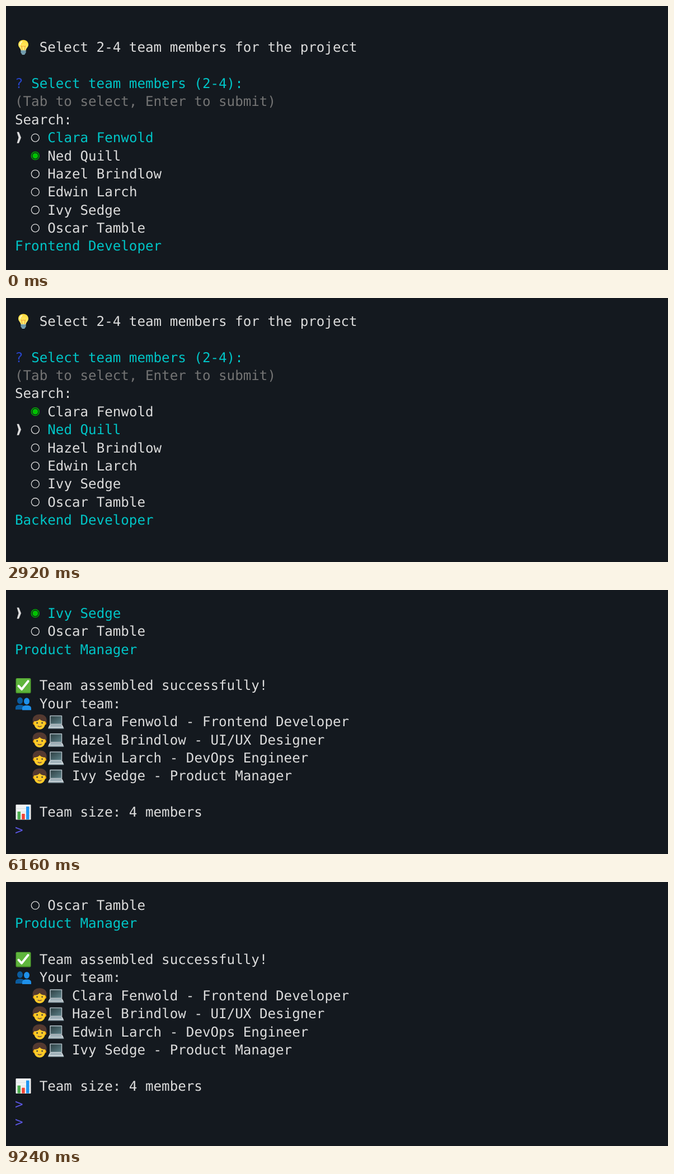
Write an HTML page that moves like this. It is 1183 px wide and 473 px high and loops after 9.28 s.

```html
<!DOCTYPE html>
<html lang="en">
<head>
<meta charset="utf-8">
<title>Team selection prompt</title>
<style>
  html, body { margin: 0; width: 100%; height: 100%; overflow: hidden; background: #14191f; }
  svg { display: block; width: 1183px; height: 473px; }
  text { font: 24.2px "DejaVu Sans Mono", "Noto Sans Mono", monospace; text-rendering: geometricPrecision; }
</style>
</head>
<body>
<svg viewBox="0 0 1183 473">
  <defs>
    <linearGradient id="glass" x2="0" y2="1">
      <stop offset="0" stop-color="#ffd93b"/><stop offset="1" stop-color="#fff176"/>
    </linearGradient>
    <linearGradient id="screen" x2="1" y2="1">
      <stop offset="0" stop-color="#2f4145"/><stop offset="1" stop-color="#5c8087"/>
    </linearGradient>
    <g id="bulb">
      <path d="M14 .5C8.500.5 5 4.400 5 9c0 4.500 4 6 4.600 10.500h8.800C19 15 23 13.500 23 9 23 4.400 19.500.5 14 .5Z" fill="url(#glass)"/>
      <path d="M12 19 10.500 11l2 1.500 1.500-1.500 1.500 1.500 2-1.500L16 19" fill="none" stroke="#f19534"/>
      <path d="M9.500 19h9v4.500l-2.500 3.500h-4l-2.500-3.500Z" fill="#82aec0"/>
      <path d="M9.500 21.500h9M10 24h8" stroke="#557b8a"/>
      <path d="M8 9Q8.500 5 11.500 3.500" fill="none" stroke="#fff9c4" stroke-width="2" stroke-linecap="round"/>
    </g>
    <g id="check">
      <rect x=".5" y=".5" width="27" height="27" rx="2" fill="#4c9a2a"/>
      <rect x="1.500" y="1" width="25" height="24.500" rx="2" fill="#5fb53d"/>
      <path d="M5.500 14.500 11 20.500 22.500 6" fill="none" stroke="#fff" stroke-width="4" stroke-linecap="round" stroke-linejoin="round"/>
    </g>
    <g id="bust">
      <ellipse cx="8" cy="8.500" rx="5" ry="6"/>
      <path d="M0 24.500v-3c0-4 3-5.500 8-5.500s8 1.500 8 5.500v3Z"/>
    </g>
    <g id="people">
      <use href="#bust" fill="#0b5c9e"/>
      <use href="#bust" x="12" y="1" fill="#1e90ea"/>
    </g>
    <g id="person">
      <path d="M14 .5C6 .5 1.500 5 1.500 11c0 3 .5 5 1.500 6.500h22c1-1.500 1.500-3.500 1.500-6.500C26.500 5 22 .5 14 .5Z" fill="#543930"/>
      <rect x="2" y="14" width="24" height="5.500" rx="2.700" fill="#e59600"/>
      <path d="M4 13c5 0 8-1.500 10-4 2 2.500 5 4 10 4v3c0 7-4.500 11.500-10 11.500S4 23 4 16Z" fill="#ffca28"/>
      <circle cx="9.500" cy="16" r="1.400" fill="#404040"/>
      <circle cx="18.500" cy="16" r="1.400" fill="#404040"/>
      <path d="M10.500 21.500Q14 24 17.500 21.500" fill="none" stroke="#795548" stroke-width="1.500"/>
    </g>
    <g id="laptop">
      <rect x="3" y="2.500" width="22" height="16.500" rx="1" fill="#b0bec5"/>
      <rect x="4.500" y="4" width="19" height="13.500" fill="url(#screen)"/>
      <path d="M3 19h22l3 6H0Z" fill="#cfd8dc"/>
      <path d="M4 20.500h20M3.500 22.300h21" stroke="#78909c"/>
      <path d="M0 25h28v1.500H0Z" fill="#90a4ae"/>
    </g>
    <g id="chart">
      <rect x=".5" y=".5" width="27" height="27" rx="1" fill="#f1f3f4"/>
      <path d="M.5 7.500h27M.5 14h27M.5 20.500h27" stroke="#cfd8dc" stroke-width=".7"/>
      <path d="M3.500 13h5.500v14H3.500Z" fill="#4caf50"/>
      <path d="M11.200 17h5.500v10h-5.500Z" fill="#f44336"/>
      <path d="M19 4h5.500v23H19Z" fill="#2196f3"/>
    </g>
  </defs>
  <g id="stage"></g>
</svg>
<script>
const LOOP = 9280, LEFT = 16, TOP = 25, CELL = 14.567, LINE = 32.36;
const WHITE = '#dcdcdc', CYAN = '#00c5c7', GREEN = '#00c200', YELLOW = '#c7c400',
      GRAY = '#747474', BLUE = '#2744c7', PROMPT = '#5a56e0';

// Each member is selected during [on, off).
const MEMBERS = [
  { name: 'Clara Fenwold',  role: 'Frontend Developer', on: 2120 },
  { name: 'Ned Quill',      role: 'Backend Developer',  on: 0, off: 2920 },
  { name: 'Hazel Brindlow', role: 'UI/UX Designer',     on: 3760 },
  { name: 'Edwin Larch',    role: 'DevOps Engineer',    on: 4600 },
  { name: 'Ivy Sedge',      role: 'Product Manager',    on: 5400 },
  { name: 'Oscar Tamble',   role: '',                   on: LOOP }
];
const MOVES = [2880, 3720, 4480, 5320];
const BLINKS = [6200, 6560, 6840, 7160, 7280, 7560, 7760, 8040, 8320, 8560, 8840, 9240];
const ERROR_ON = 720, ERROR_OFF = 2120, SUBMIT = 6160, NEW_PROMPT = 7760;

const x = col => LEFT + col * CELL;
const y = row => TOP + row * LINE;
const passed = (times, t) => times.filter(time => time <= t).length;
const isSelected = (member, t) => t >= member.on && t < (member.off ?? LOOP);

const text = (col, row, string, color = WHITE) =>
  `<text x="${x(col)}" y="${y(row) + 25}" fill="${color}">${string.replace('>', '&gt;')}</text>`;
const icon = (id, col, row) => `<use href="#${id}" x="${x(col) + 1}" y="${y(row) + 3}"/>`;
const ring = (row, r, attributes) =>
  `<circle cx="52.3" cy="${y(row) + 16.9}" r="${r}" ${attributes}/>`;

function option(row, member, selected, active) {
  const color = selected ? GREEN : WHITE;
  return (active ? `<path transform="translate(0 ${y(row)})" fill="${WHITE}"
      d="M19.500 6.500h3.500L27 16.500 23 26.500h-3.500L22.500 16.500Z"/>` : '')
    + ring(row, 7, `fill="none" stroke="${color}" stroke-width="1.300"`)
    + (selected ? ring(row, 5, `fill="${color}"`) : '')
    + text(4, row, member.name, active ? CYAN : WHITE);
}

function selection(t) {
  const top = t < ERROR_ON ? 1 : 0;
  const hasError = t >= ERROR_ON && t < ERROR_OFF;
  const first = top + (hasError ? 6 : 5);
  const active = passed(MOVES, t);
  return icon('bulb', 0, top) + text(3, top, 'Select 2-4 team members for the project')
    + text(0, top + 2, '?', BLUE) + text(2, top + 2, 'Select team members (2-4):', CYAN)
    + text(0, top + 3, '(Tab to select, Enter to submit)', GRAY)
    + text(0, top + 4, 'Search:')
    + (hasError ? text(0, 5, '> Please select at least 2 team members', YELLOW) : '')
    + MEMBERS.map((m, i) => option(first + i, m, isSelected(m, t), i === active)).join('')
    + text(0, first + MEMBERS.length, MEMBERS[active].role, CYAN);
}

function summary(t) {
  const top = t < NEW_PROMPT ? 0 : -1;
  const team = MEMBERS.filter(m => isSelected(m, t));
  const cursorOn = passed(BLINKS, t) % 2;
  return (top ? text(0, 11, '>', PROMPT) : option(0, MEMBERS[4], true, true))
    + option(top + 1, MEMBERS[5], false, false)
    + text(0, top + 2, MEMBERS[4].role, CYAN)
    + icon('check', 0, top + 4) + text(3, top + 4, 'Team assembled successfully!')
    + icon('people', 0, top + 5) + text(3, top + 5, 'Your team:')
    + team.map((m, i) => icon('person', 2, top + 6 + i) + icon('laptop', 4, top + 6 + i)
        + text(7, top + 6 + i, `${m.name} - ${m.role}`)).join('')
    + icon('chart', 0, top + 11) + text(3, top + 11, `Team size: ${team.length} members`)
    + text(0, 12, '>', PROMPT)
    + (cursorOn ? `<rect x="${x(2)}" y="${y(12)}" width="${CELL}" height="${LINE}" fill="#fff"/>` : '');
}

const stage = document.getElementById('stage');
let shown = '';
function draw() {
  const t = performance.now() % LOOP;
  const markup = t < SUBMIT ? selection(t) : summary(t);
  if (markup !== shown) stage.innerHTML = shown = markup;
  requestAnimationFrame(draw);
}
draw();
</script>
</body>
</html>
```
